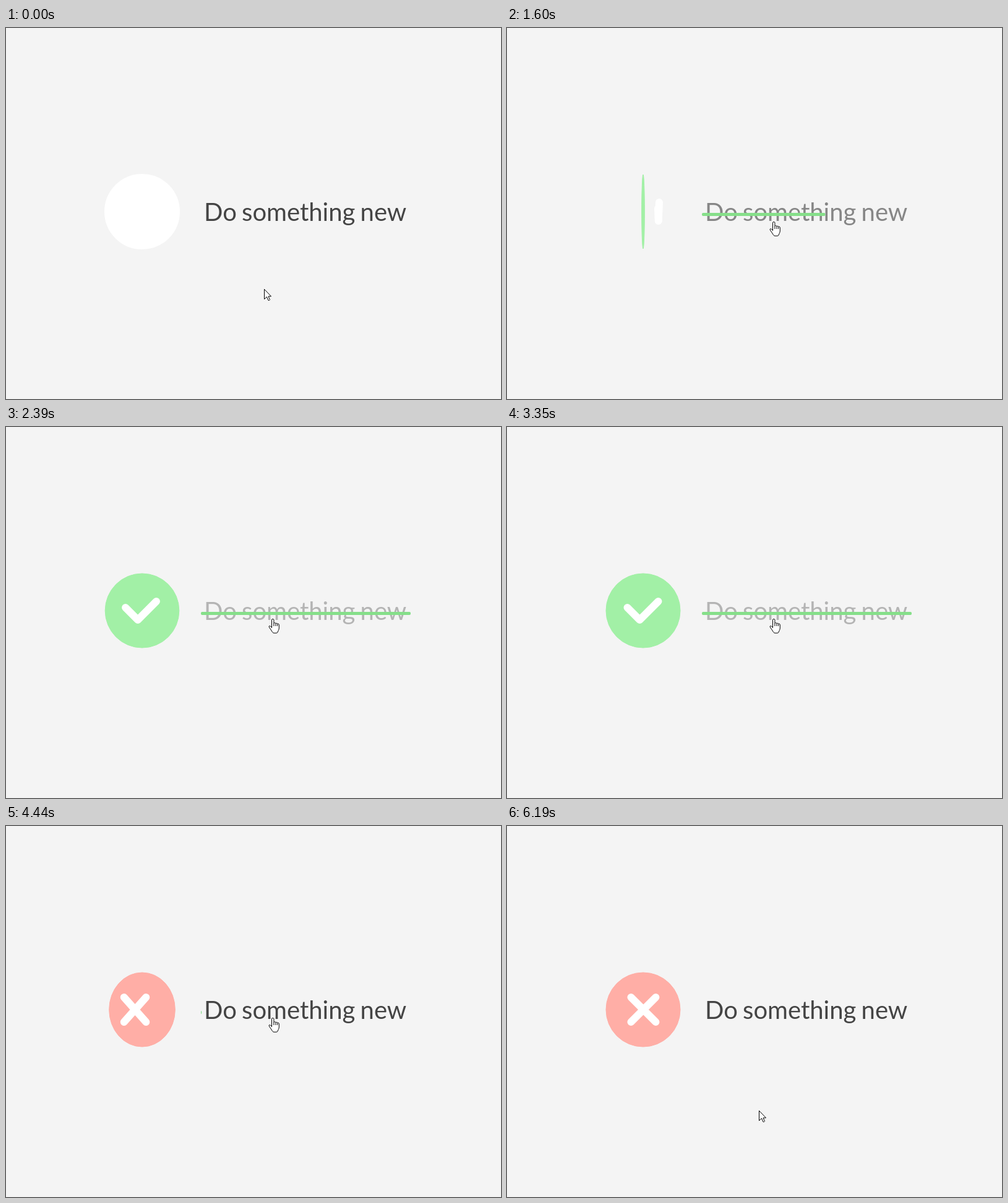
These frames come from a looping animation (800x600 px, 6.35 s). An HTML page:

```html
<!DOCTYPE html>
<html lang="en">
<head>
<meta charset="utf-8">
<title>Todo toggle</title>
<style>
  html, body { margin: 0; width: 100%; height: 100%; overflow: hidden; background: #f4f4f4; }
  svg { display: block; }
  text { font: 40px Lato, "Open Sans", sans-serif; word-spacing: -2px; }
  .mark { fill: none; stroke: #fff; stroke-width: 12; stroke-linecap: round; stroke-linejoin: round; }
  .mark, #disc { vector-effect: non-scaling-stroke; }
  .cursor path { fill: #fff; stroke: #000; stroke-linejoin: round; }
  .cursor .crease { fill: none; }
</style>
</head>
<body>
<svg width="800" height="600" viewBox="0 0 800 600">
  <g transform="translate(220 297)">
    <circle id="disc" r="60"/>
    <path id="mark" class="mark"/>
  </g>
  <text id="label" x="320" y="312">Do something new</text>
  <rect id="strike" x="315" y="299" height="5" rx="2" fill="#86df8a"/>
  <g id="arrow" class="cursor">
    <path d="M.5 .5V16.5L4.5 12.8L7 18.5H8.5L9.5 17.5L7 12H11.5Z"/>
  </g>
  <g id="hand" class="cursor">
    <path d="M-.5 14.5V2.2a1.7 1.7 0 0 1 3.4 0V7.5c.3-1.2 3-1.2 3.1 .4c.3-.9 2.8-.7 2.8 .7c.5-.8 2.5-.4 2.5 1.2V15c0 3-1.5 4.5-2 6q-.4 2.2-2.2 2.2H3c-1.8 0-2.5-1.5-3.5-3.2L-4.5 14c-1.2-1.9 .3-3 1.7-2Z"/>
    <path class="crease" d="M2.9 7.5V12M6 8V12M8.8 8.6V12"/>
  </g>
</svg>
<script>
const LOOP = 6350;
const FLIP = 2700;     // elastic settling time of a flip
const STRIKE = 272;    // time to draw or erase the line
const DEPTH = 25;      // how far the marks float above the disc
const UNDO = 4170;     // second click

const faces = {
  blank: { fill: '#fff', edge: 2, d: '' },
  done:  { fill: '#a2f0a6', edge: 1, d: 'M-25-5L-5 15L25-15' },
  undone: { fill: '#ffaea6', edge: 1, d: 'M-20-20L20 20M20-20L-20 20' }
};

// pointer tip: time, x, y
const route = [
  [0, 417, 422], [500, 417, 422], [970, 430, 313], [1660, 430, 313],
  [1760, 430, 310], [4690, 430, 310], [4800, 430, 347], [4980, 417, 415],
  [5100, 409, 452], [5400, 407, 460], [LOOP, 407, 460]
];

const el = id => document.getElementById(id);
const set = (node, attrs) => {
  for (const name in attrs) node.setAttribute(name, attrs[name]);
};
const clamp = x => Math.min(1, Math.max(0, x));

// part of the half turn still to go
function remaining(ms) {
  const t = clamp(ms / FLIP);
  return t === 1 ? 0 : 2 ** (-10 * t) * Math.cos(4 * Math.PI * t);
}

function drawDisc(from, to, ms, side) {
  const angle = Math.PI * remaining(ms);
  const turn = Math.cos(angle);
  const face = turn > 0 ? to : from;
  const facing = turn > 0 ? side : -side;
  const width = Math.max(.001, Math.abs(turn));
  set(disc, {
    transform: `scale(${width} 1)`,
    fill: face.fill, stroke: face.fill, 'stroke-width': face.edge
  });
  set(mark, {
    d: face.d,
    transform: `translate(${facing * DEPTH * Math.sin(angle)} 0) scale(${width} 1)`
  });
}

function drawLabel(done) {
  const grey = Math.round(68 + 112 * done);
  set(label, { fill: `rgb(${grey},${grey},${grey})` });
  set(strike, { width: 339 * done });
}

function drawPointer(now) {
  const i = Math.max(1, route.findIndex(stop => stop[0] > now));
  const [t0, x0, y0] = route[i - 1];
  const [t1, x1, y1] = route[i];
  let k = (now - t0) / (t1 - t0);
  if (i === 2) k = k * k * (3 - 2 * k);
  const x = Math.round(x0 + (x1 - x0) * k);
  const y = Math.round(y0 + (y1 - y0) * k);
  const over = y < 358;
  set(arrow, { transform: `translate(${x} ${y})`, visibility: over ? 'hidden' : 'visible' });
  set(hand, { transform: `translate(${x} ${y})`, visibility: over ? 'visible' : 'hidden' });
}

const [disc, mark, label, strike, arrow, hand] =
  ['disc', 'mark', 'label', 'strike', 'arrow', 'hand'].map(el);
const start = performance.now();

function draw() {
  const now = Math.max(0, performance.now() - start) % LOOP;
  // the first flip starts a little slower
  const first = Math.max(0, now < 1600 ? (now - 1400) * .795 : now - 1441);
  const second = now - UNDO;
  if (second < 0) {
    drawDisc(faces.blank, faces.done, first, 1);
    drawLabel(clamp(first / STRIKE));
  } else {
    drawDisc(faces.done, faces.undone, second, -1);
    drawLabel(1 - clamp(second / STRIKE));
  }
  drawPointer(now);
  requestAnimationFrame(draw);
}
draw();
</script>
</body>
</html>
```
